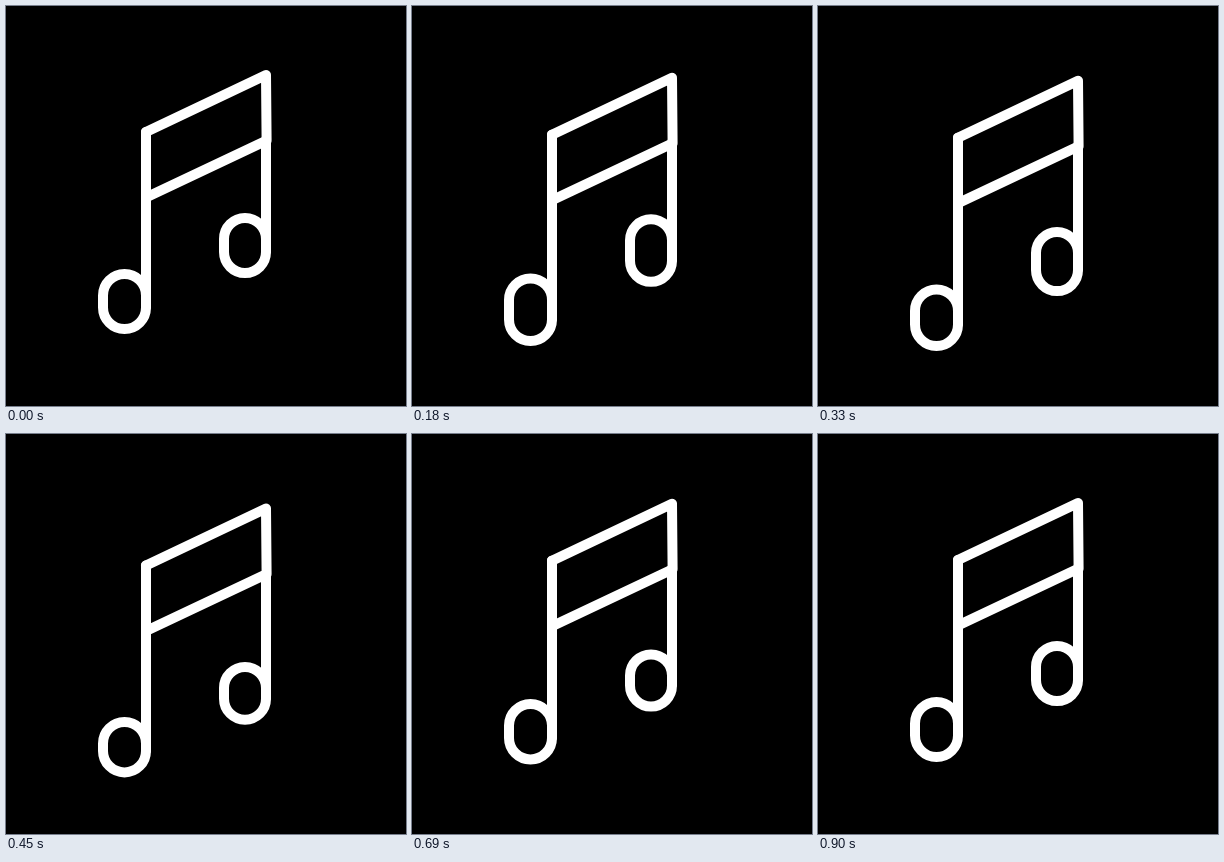
An HTML page with a canvas for the animation above (1960 ms loop, 400 px wide and 400 px high).

```html
<!DOCTYPE html>
<html>
<head>
<meta charset="utf-8">
<style>
html, body { margin: 0; width: 100%; height: 100%; overflow: hidden; background: #000; }
canvas { display: block; width: 400px; height: 400px; }
</style>
</head>
<body>
<canvas id="stage" width="400" height="400"></canvas>
<script>
const ctx = document.getElementById('stage').getContext('2d');
const LOOP = 1960, STEP = 30, END = 900;

// Eased 0..1 between two times
function ease(t, from, to) {
  const u = Math.min(1, Math.max(0, (t - from) / (to - from)));
  return u * u * (3 - 2 * u);
}

// Rises from 0 to 1 between a and b, falls back between c and d
const bounce = (t, a, b, c, d) => ease(t, a, b) - ease(t, c, d);

function line(points, closed) {
  ctx.beginPath();
  points.forEach(p => ctx.lineTo(p[0], p[1]));
  if (closed) ctx.closePath();
  ctx.stroke();
}

// Capsule-shaped note head whose right side continues the stem
function head(left, right, top, bottom) {
  const r = (right - left) / 2, x = left + r;
  ctx.beginPath();
  ctx.arc(x, top + r, r, Math.PI, 0);
  ctx.arc(x, bottom - r, r, 0, Math.PI);
  ctx.closePath();
  ctx.stroke();
}

function draw(t) {
  const drop = 6 * bounce(t, 0, 380, 380, 770);
  const leftTop = 268 + 20 * bounce(t, 60, 450, 450, 750);
  const leftBottom = 323 + 17 * bounce(t, 0, 280, 370, 790);
  const rightTop = 212 + 21 * bounce(t, 130, 455, 535, 810);
  const rightBottom = 267 + 19 * bounce(t, 0, 380, 420, 840);

  ctx.fillStyle = '#000';
  ctx.fillRect(0, 0, 400, 400);
  ctx.strokeStyle = '#fff';
  ctx.lineWidth = 10;
  ctx.lineCap = ctx.lineJoin = 'round';

  ctx.save();
  ctx.translate(0, drop);
  line([[140, 191.5], [140, 126], [260, 69], [260.6, 134.5]], true);
  ctx.restore();

  line([[140, 126 + drop], [140, leftBottom - 22]]);
  line([[260, 134 + drop], [260, rightBottom - 22]]);
  head(97, 140, leftTop, leftBottom);
  head(218, 260, rightTop, rightBottom);
}

function tick() {
  const t = performance.now() % LOOP;
  draw(Math.min(END, Math.floor(t / STEP) * STEP));
  requestAnimationFrame(tick);
}
tick();
</script>
</body>
</html>
```
